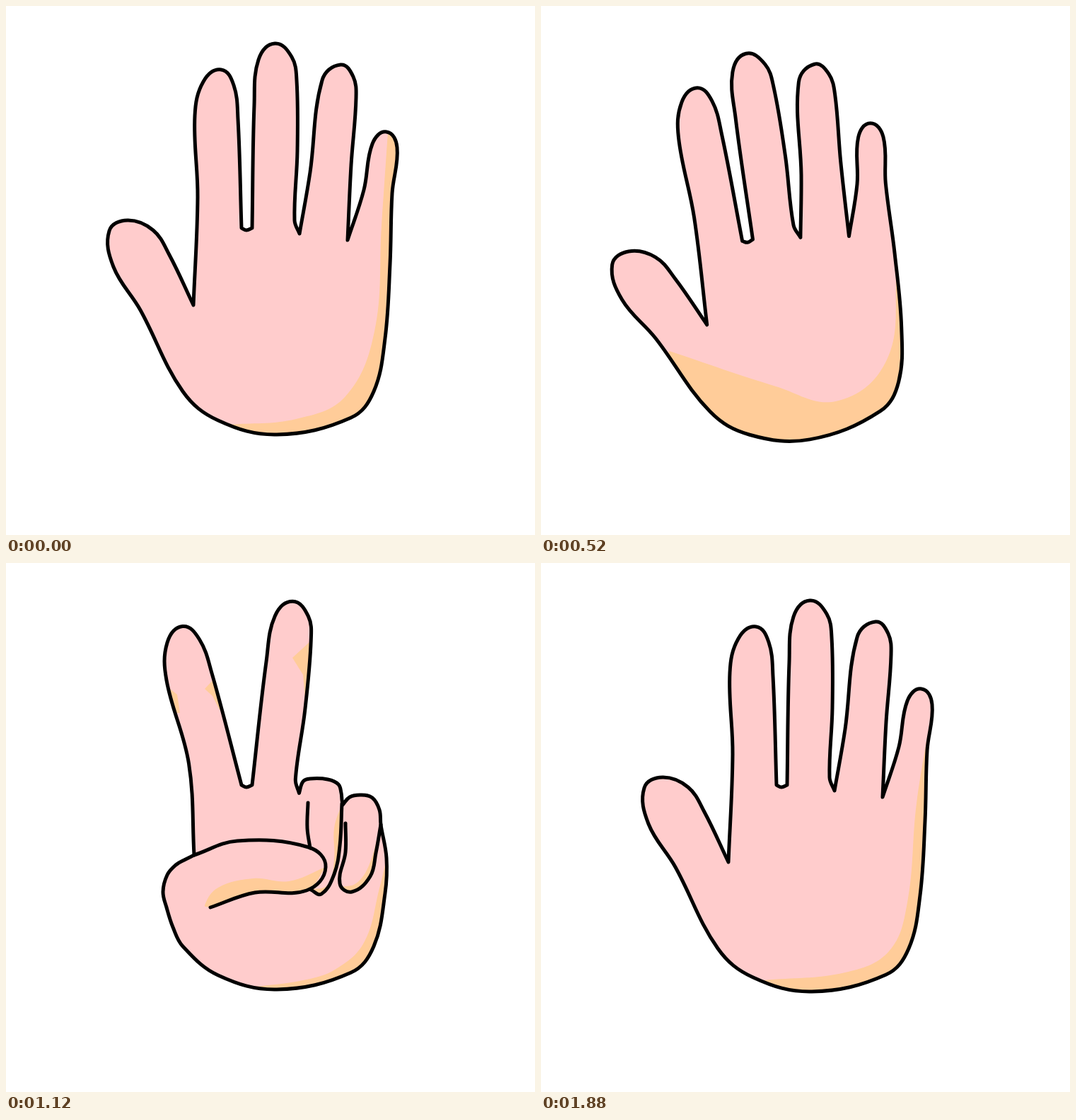
Animation, 748 px wide and 748 px high, one loop 1.92 s. Source, as an HTML page with a canvas:

```html
<!DOCTYPE html>
<html lang="en">
<head>
<meta charset="utf-8">
<title>Hand wave</title>
<style>
html, body { margin: 0; width: 100%; height: 100%; overflow: hidden; background: #fff; }
canvas { display: block; }
</style>
</head>
<body>
<canvas id="stage" width="748" height="748"></canvas>
<script>
const ctx = document.getElementById('stage').getContext('2d');
const SKIN = '#ffcccc', SHADE = '#ffcc99', LINE = 5;
const LOOP = 1920, STEP = 40, ROUND = 0.37;
const WRIST = [425, 628], GROW = [208, 40], TILT = -21.15;

const mix = (a, b, k) => a + (b - a) * k;
const blend = (p, q, k) => p.map(([x, y], i) => [mix(x, q[i][0], k), mix(y, q[i][1], k)]);
const shift = (p, dx, dy) => p.map(([x, y]) => [x + dx, y + dy]);
const last = p => p[p.length - 1];

function pts(s) {
  const n = s.split(/\s+/).map(Number);
  return n.flatMap((v, i) => i % 2 ? [[n[i - 1], v]] : []);
}

function turned(p, [cx, cy], deg, size = 1) {
  const c = Math.cos(deg * Math.PI / 180) * size, s = Math.sin(deg * Math.PI / 180) * size;
  return p.map(([x, y]) => [cx + (x - cx) * c - (y - cy) * s, cy + (x - cx) * s + (y - cy) * c]);
}

// Open hand: key points, with a sharp corner at the end of each chain.
const index = pts('271 270 267 155 279 107 304 90 322 112 328 160 333 314');
const valley = pts('340 317 348 314');
const middle = pts('351 140 357 76 380 53 404 72 411 105 412 205 408 303 415 322');
const ring = pts('430 235 447 105 473 83 491 100 495 130 488 225 483 331');
const pinky = pts('506 260 518 195 538 178 553 200 546 265 543 365');
const palm = pts('536 470 520 545 488 582 383 606 300 586 250 545');
const thumb = pts('190 430 152 369 146 318 172 303 208 317 231 352 265 423');
const open = [index, valley, middle, ring, [...pinky, ...palm, ...thumb]];

// Peace sign: two fingers spread, the others curl in.
const peace = [
  turned(index, [333, 314], -13, 1.06),
  valley,
  turned(middle, [380, 318], 5.5),
  pts('420 309 430 305 455 306 470 313 474 325 475 335 476 342'),
  [
    ...pts('486 331 502 328 518 332 528 349 530 370 538 417'),
    ...shift(palm, 0, -3),
    ...pts('236 515 227 487 222 465 228 441 240 427 252 420 266 413')
  ]
];

// Curled fingers grow from a point on the open outline; shade lies along the line from point `from` on.
const curl = (at, line, from, inner) => ({ at: pts(at)[0], line: pts(line), from, inner: inner && pts(inner) });
const curls = [
  curl('483 331', '427 339 426 375 430 403'),
  curl('483 331', '475 340 472 400 464 440 446 468 431 462', 0, '455 455 464 420 464 375 475 340'),
  curl('543 365', '480 368 480 409 472 453 489 465 515 443 523 410 530 370', 2, '513 428 495 453 473 458'),
  curl('265 423', '266 413 327 393 428 402 452 430 425 463 352 466 289 487', 3,
    '281 484 300 459 350 446 400 450 452 430')
];
const spots = [
  '232 178 242 186 246 212 236 212',
  '294 164 281 178 292 188 302 208 310 200',
  '442 100 405 134 420 158 423 192 440 192'
].map(pts);

// Inner border of the shadow along the edge of the hand.
const edges = {
  side: pts('540 178 531 310 521 460 480 552 410 584 315 592'),
  full: pts('552 195 528 310 515 470 490 552 430 572 256 548'),
  slim: pts('554 202 531 340 518 480 492 549 430 579 315 590'),
  tilt: pts('575 200 550 545 493 577 347 567 238 461 140 322'),
  fist: pts('542 400 528 460 506 537 465 575 420 590 345 600')
};

const key = (t, edge, fold = 0, turn = 0, size = 1) => ({ t, edge: edges[edge], fold, turn, size });
const keys = [
  key(0, 'side'),
  key(240, 'tilt', 0, TILT),
  key(400, 'full'),
  key(680, 'tilt', 0, TILT),
  key(840, 'full'),
  key(1120, 'fist', 1),
  key(1200, 'fist', 1),
  key(1520, 'fist', 1, 0, 1.126),
  key(1560, 'fist', 1, 0, 1.126),
  key(1680, 'fist', 1),
  key(1880, 'slim'),
  key(LOOP, 'side')
];

function poseAt(t) {
  const i = keys.findIndex(k => k.t > t);
  const a = keys[i - 1], b = keys[i];
  const k = (t - a.t) / (b.t - a.t);
  const at = name => mix(a[name], b[name], k);
  return { edge: blend(a.edge, b.edge, k), fold: at('fold'), turn: at('turn'), size: at('size') };
}

// Direction of the curve at a point: along the chord between its neighbours.
function heading(p, i) {
  const [x0, y0] = p[Math.max(i - 1, 0)], [x1, y1] = p[Math.min(i + 1, p.length - 1)];
  const d = Math.hypot(x1 - x0, y1 - y0) || 1;
  return [(x1 - x0) / d, (y1 - y0) / d];
}

function smooth(p) {
  for (let i = 1; i < p.length; i++) {
    const [ax, ay] = p[i - 1], [bx, by] = p[i];
    const [ux, uy] = heading(p, i - 1), [vx, vy] = heading(p, i);
    const h = Math.hypot(bx - ax, by - ay) * ROUND;
    ctx.bezierCurveTo(ax + ux * h, ay + uy * h, bx - vx * h, by - vy * h, bx, by);
  }
}

function trace(p) {
  ctx.beginPath();
  ctx.moveTo(...p[0]);
  smooth(p);
}

function traceHand(chains) {
  let from = last(last(chains));
  ctx.beginPath();
  ctx.moveTo(...from);
  for (const c of chains) {
    smooth([from, ...c]);
    from = last(c);
  }
  ctx.closePath();
}

const grow = (p, at, k) => p.map(([x, y]) => [mix(at[0], x, k), mix(at[1], y, k)]);

function about([x, y], change) {
  ctx.translate(x, y);
  change();
  ctx.translate(-x, -y);
}

function shadeCurls(fold) {
  for (const s of spots) {
    ctx.beginPath();
    grow(s, s[0], fold).forEach(p => ctx.lineTo(...p));
    ctx.fill();
  }
  for (const c of curls.filter(c => c.inner)) {
    const rim = grow(c.line.slice(c.from), c.at, fold);
    trace(rim);
    smooth([last(rim), ...grow(c.inner, c.at, fold)]);
    ctx.fill();
  }
}

function draw(t) {
  const { edge, fold, turn, size } = poseAt(t);
  const hand = open.map((c, i) => blend(c, peace[i], fold));
  ctx.fillStyle = '#fff';
  ctx.fillRect(0, 0, 748, 748);
  ctx.save();
  about(WRIST, () => ctx.rotate(turn * Math.PI / 180));
  about(GROW, () => ctx.scale(size, size));

  ctx.save();
  traceHand(hand);
  ctx.fillStyle = SKIN;
  ctx.fill();
  ctx.clip();
  ctx.fillStyle = SHADE;
  trace(edge);
  ctx.lineTo(100, 700);
  ctx.lineTo(700, 700);
  ctx.lineTo(700, 150);
  ctx.fill();
  if (fold > 0) shadeCurls(fold);
  ctx.restore();

  ctx.strokeStyle = '#000';
  ctx.lineWidth = LINE / size;
  ctx.lineJoin = ctx.lineCap = 'round';
  traceHand(hand);
  ctx.stroke();
  if (fold > 0) {
    for (const c of curls) {
      trace(grow(c.line, c.at, fold));
      ctx.stroke();
    }
  }
  ctx.restore();
}

const begin = performance.now();
function tick() {
  const t = (performance.now() - begin) % LOOP;
  draw(Math.floor(t / STEP) * STEP);
  requestAnimationFrame(tick);
}
tick();
</script>
</body>
</html>
```
